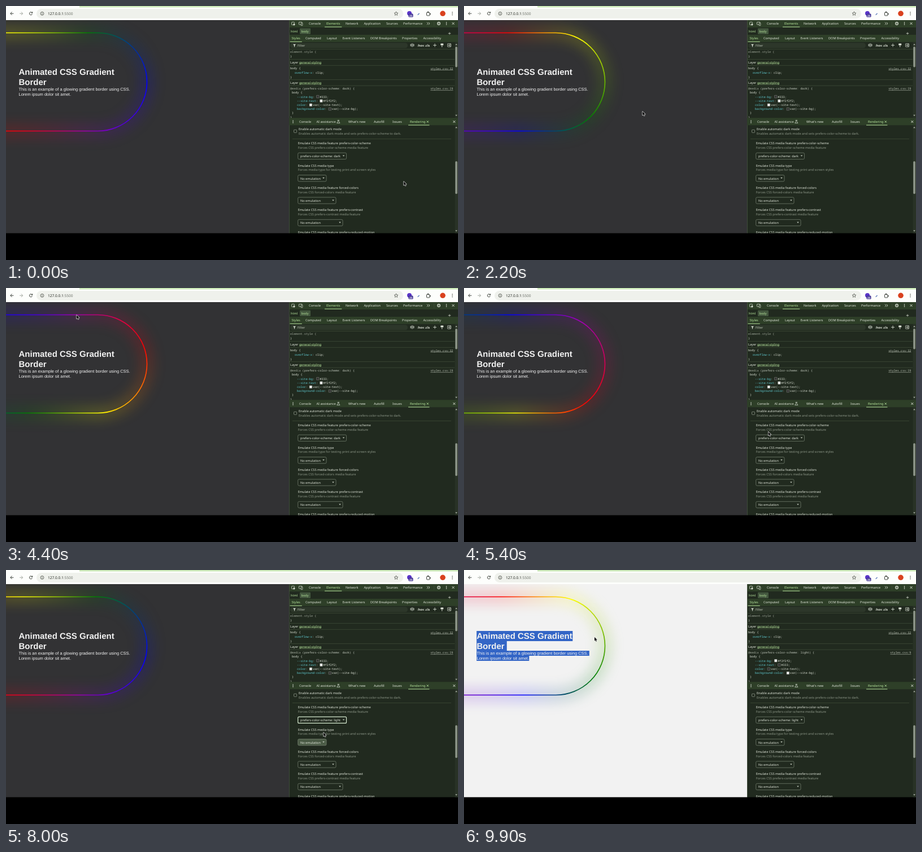
Write an HTML page with a canvas that moves like this. It is 800 by 450 pixels and loops after 10 s.

```html
<!DOCTYPE html>
<html lang="en">
<head>
<meta charset="utf-8">
<title>Animated CSS gradient border</title>
<style>
  html, body { margin: 0; width: 100%; height: 100%; overflow: hidden; background: #000; }
  canvas { display: block; width: 800px; height: 450px; }
</style>
</head>
<body>
<canvas id="stage" width="800" height="450"></canvas>
<script>
const ctx = document.getElementById('stage').getContext('2d');
const LOOP = 10000, STEP = 100;
const UI = '5.62px "Noto Sans", sans-serif';
const MONO = '5.156px "Noto Sans Mono", monospace';
const HEAD = 'bold 15px "Liberation Sans", Arial, sans-serif';
const BODY = '7.5px "Liberation Sans", Arial, sans-serif';
const PANEL = '#212a1f', BAR = '#2e3f28', RULE = '#46543f';
const INK = '#dfe5d9', DIM = '#8d9788', ACCENT = '#b5e29b', CYAN = '#62cfd6';

// time, x, y of the pointer tip
const PATH = [
  [0, 704, 311], [600, 704, 311], [1100, 514, 262], [2200, 316, 187], [3300, 214, 112],
  [4400, 125, 48], [4700, 150, 70], [5500, 556, 263], [6400, 579, 265], [6700, 576, 268],
  [7300, 562, 288], [8100, 562, 288], [9100, 247, 153], [9300, 116, 157],
  [9600, 24, 113], [9900, 231, 119], [10000, 231, 119]
];
const LIGHT_AT = 8100, FOCUS = [6400, 9300], MENU = [6500, 7800];

const between = (t, [a, b]) => t >= a && t < b;

function pointer(t) {
  const i = Math.max(1, PATH.findIndex(k => k[0] >= t));
  const [t0, x0, y0] = PATH[i - 1], [t1, x1, y1] = PATH[i];
  const u = (t - t0) / (t1 - t0), e = u * u * (3 - 2 * u);
  return { x: x0 + (x1 - x0) * e, y: y0 + (y1 - y0) * e };
}

function rect(x, y, w, h, color) {
  ctx.fillStyle = color;
  ctx.fillRect(x, y, w, h);
}

function round(x, y, w, h, r, fill, stroke, lw = 0.8) {
  ctx.beginPath();
  ctx.roundRect(x, y, w, h, r);
  if (fill) { ctx.fillStyle = fill; ctx.fill(); }
  if (stroke) { ctx.strokeStyle = stroke; ctx.lineWidth = lw; ctx.stroke(); }
}

function disc(x, y, r, color) {
  ctx.beginPath();
  ctx.arc(x, y, r, 0, 7);
  ctx.fillStyle = color;
  ctx.fill();
}

function ring(x, y, r, color, lw = 0.9, a = 0, b = Math.PI * 2) {
  ctx.beginPath();
  ctx.arc(x, y, r, a, b);
  ctx.strokeStyle = color;
  ctx.lineWidth = lw;
  ctx.stroke();
}

function line(color, lw, ...p) {
  ctx.beginPath();
  for (let i = 0; i < p.length; i += 2) ctx.lineTo(p[i], p[i + 1]);
  ctx.strokeStyle = color;
  ctx.lineWidth = lw;
  ctx.stroke();
}

function poly(color, ...p) {
  ctx.beginPath();
  for (let i = 0; i < p.length; i += 2) ctx.lineTo(p[i], p[i + 1]);
  ctx.closePath();
  ctx.fillStyle = color;
  ctx.fill();
}

function text(s, x, y, color = INK, font = UI, underline = false) {
  ctx.font = font;
  ctx.fillStyle = color;
  ctx.fillText(s, x, y);
  const w = ctx.measureText(s).width;
  if (underline) rect(x, y + 0.8, w, 0.5, color);
  return x + w;
}

const cross = (x, y, r, c) => { line(c, 0.9, x - r, y - r, x + r, y + r); line(c, 0.9, x - r, y + r, x + r, y - r); };
const dots = (x, y, gap, c) => { for (const d of [-gap, 0, gap]) disc(x, y + d, 0.75, c); };
const caret = (x, y, c, s = 1) => poly(c, x - 1.8, y - s, x + 1.8, y - s, x, y + s);

function browserBar() {
  rect(0, 0, 800, 25, '#fdfefc');
  rect(130, 0, 670, 2.5, '#cbe9b8');
  round(54, 5, 649, 17, 8.5, '#eff1ec');
  const ink = '#3f443c';
  line(ink, 1, 10.5, 10.5, 7.8, 13.3, 10.5, 16.1);
  line(ink, 1, 8, 13.3, 13.4, 13.3);
  line('#a3a8a0', 1, 27, 10.5, 29.7, 13.3, 27, 16.1);
  line('#a3a8a0', 1, 24.2, 13.3, 29.5, 13.3);
  ring(44, 13.3, 2.6, ink, 1, 0.3, 5.5);
  poly(ink, 47.2, 9.8, 47.2, 12.8, 44.2, 12.8);
  ring(64, 13.4, 2.9, ink, 0.8);
  line(ink, 0.8, 64, 13, 64, 15.1);
  rect(63.6, 11.6, 0.8, 0.8, ink);
  const font = '6.56px "Noto Sans", sans-serif';
  text(':5500', text('127.0.0.1', 74, 16, '#22261f', font), 16, '#6c7169', font);

  ctx.beginPath();
  for (let i = 0; i < 10; i++) {
    const a = -Math.PI / 2 + i * Math.PI / 5, r = i % 2 ? 1.6 : 3.6;
    ctx.lineTo(690.5 + r * Math.cos(a), 13.5 + r * Math.sin(a));
  }
  ctx.closePath();
  ctx.strokeStyle = ink;
  ctx.lineWidth = 0.7;
  ctx.stroke();

  disc(714, 13, 4, '#5a35c8');
  round(712.5, 13.4, 8, 6.4, 1.5, '#3d2f91');
  text('25', 713.7, 18.6, '#fff', 'bold 4.8px "Noto Sans", sans-serif');
  line('#4e6fb5', 1.2, 728.7, 15.8, 731.5, 13);
  round(744.5, 11.5, 5.5, 5.5, 0.6, null, ink, 1);
  disc(747, 10.7, 1.1, ink);
  disc(750.7, 14.2, 1.1, ink);
  disc(773, 13.3, 4.8, '#d9411e');
  dots(790, 13.3, 2.4, ink);
}

function pill() {
  ctx.beginPath();
  ctx.moveTo(-60, 47.5);
  ctx.lineTo(162.5, 47.5);
  ctx.arc(162.5, 134.5, 87, -Math.PI / 2, Math.PI / 2);
  ctx.lineTo(-60, 221.5);
}

function page(t, light) {
  ctx.save();
  ctx.beginPath();
  ctx.rect(0, 25, 501, 377.5);
  ctx.clip();
  rect(0, 25, 501, 378, light ? '#f2f2f2' : '#323234');

  // hue ring turns clockwise, 46 degrees a second
  const hue = ctx.createConicGradient((145 + 0.046 * t) * Math.PI / 180, 115, 134.5);
  ['#f00', '#ff0', '#008000', '#00f', '#a000b0', '#f00'].forEach((c, i) => hue.addColorStop(i / 5, c));
  ctx.strokeStyle = hue;
  ctx.filter = 'blur(12px)';
  ctx.globalAlpha = 0.26;
  ctx.lineWidth = 16;
  pill();
  ctx.stroke();
  ctx.filter = 'none';
  ctx.globalAlpha = 1;
  ctx.lineWidth = 1.7;
  pill();
  ctx.stroke();

  // the drag runs backwards from the end of the paragraph
  const rows = [
    ['Animated CSS Gradient', 122.3, HEAD, 108, 18, 170],
    ['Border', 139.8, HEAD, 126, 17, 53.5],
    ['This is an example of a glowing gradient border using CSS.', 150.2, BODY, 143, 9, 199.5],
    ['Lorem ipsum dolor sit amet.', 158.8, BODY, 152, 9, 93]
  ];
  rows.forEach(([s, y, font, top, h, w], i) => {
    const chosen = t >= 9400 && i >= 3 - (t - 9400) / 75;
    if (chosen) rect(22.3, top, w, h, '#3365c6');
    text(s, 22.5, y, chosen || !light ? '#f2f2f2' : '#2e2e2e', font);
  });
  ctx.restore();
}

function tabs(y, list, active) {
  for (const [s, x] of list) {
    const on = s === active;
    const end = text(s, x, y, on ? ACCENT : INK);
    if (on) rect(x - 3, y + 3.4, end - x + (s === 'Rendering' ? 10 : 6), 1, ACCENT);
  }
}

function scrollbar(top, bottom, y, h) {
  rect(794.5, top, 5.5, bottom - top, '#293226');
  round(795.2, y, 3.6, h, 1.8, '#8e968a');
  caret(797, top + 4, '#a9b1a4', -1.2);
  caret(797, bottom - 4, '#a9b1a4', 1.2);
}

function prop(name, value, y, swatch) {
  let x = text(name, 515, y, CYAN, MONO);
  x = text(':', x, y, INK, MONO);
  round(x + 3.6, y - 4.2, 4.6, 4.6, 0.3, swatch, '#8b9286', 0.5);
  text(value + ';', x + 9.4, y, INK, MONO);
}

function layer(y) {
  rect(501, y - 7.6, 293, 0.6, RULE);
  text('general-styling', text('Layer ', 503, y), y, ACCENT, UI, true);
  rect(501, y + 3.2, 293, 0.6, RULE);
}

function fileLink(s, y) {
  text(s, 791.5 - s.length * 3.094, y, '#c3cabd', MONO, true);
}

function inspector(light) {
  rect(501, 25, 299, 377.5, PANEL);
  rect(501, 25, 299, 13, BAR);
  rect(501, 51, 299, 12.8, BAR);
  rect(501, 25, 0.8, 377.5, RULE);

  round(505.5, 28.5, 5, 5, 0.8, null, INK, 0.7);
  poly(INK, 508, 31, 512, 32.6, 509.7, 35);
  round(518.5, 28.5, 5.5, 4.5, 0.5, null, INK, 0.7);
  round(522.3, 30, 2.6, 4.6, 0.5, BAR, INK, 0.7);
  tabs(33.2, [['Console', 536], ['Elements', 567], ['Network', 601], ['Application', 633.5],
    ['Sources', 673], ['Performance', 703]], 'Elements');
  for (const x of [745, 747.8]) line(INK, 0.8, x, 28.8, x + 2.2, 31, x, 33.2);
  rect(757.5, 27.5, 0.6, 7.5, RULE);
  ring(766, 31, 2.4, INK, 1.1);
  disc(766, 31, 0.8, INK);
  dots(779.5, 31, 2.1, INK);
  cross(791.5, 31, 2, INK);

  round(520, 39.5, 19, 10.5, 1, '#43573e');
  text('html', 504, 46.6, ACCENT);
  text('body', 522.5, 46.6, ACCENT);
  line(INK, 0.7, 785, 46.5, 785, 50.7);
  line(INK, 0.7, 782.7, 48.6, 787.3, 48.6);

  tabs(59.4, [['Styles', 505.5], ['Computed', 530], ['Layout', 568], ['Event Listeners', 595.5],
    ['DOM Breakpoints', 645], ['Properties', 701], ['Accessibility', 738.5]], 'Styles');

  round(503, 65.2, 208, 9.4, 4.7, '#2d372a');
  poly(INK, 508, 67.7, 513, 67.7, 511, 70, 511, 72.5, 510, 72.5, 510, 70);
  text('Filter', 516, 71.7, '#b9c1b3');
  for (const d of [0, 1.9]) line(INK, 0.7, 715.5, 68.4 + d, 719, 66.6 + d, 722.5, 68.4 + d, 719, 70.2 + d, 715.5, 68.4 + d);
  text(':hov', 728, 71.6, INK, 'bold ' + UI);
  text('.cls', 741, 71.6, INK, 'bold ' + UI);
  line(INK, 0.8, 756, 69.5, 762, 69.5);
  line(INK, 0.8, 759, 66.5, 759, 72.5);
  round(769.2, 66.6, 5, 3, 0.4, INK);
  line(INK, 0.9, 771.7, 69.5, 771.7, 73);
  round(781.5, 66.7, 6, 5.6, 0.5, null, INK, 0.7);
  line(INK, 0.7, 786, 66.7, 786, 72.3);
  poly(INK, 782.6, 69.5, 784.8, 67.9, 784.8, 71.1);
  rect(501, 76, 299, 0.6, RULE);

  ctx.save();
  ctx.beginPath();
  ctx.rect(501, 76, 293, 122.5);
  ctx.clip();
  text('element.style {', 503, 83, '#a2aa9d', MONO);
  text('}', 503, 91, INK, MONO);
  layer(101.7);
  text('body {', 503, 112, INK, MONO);
  fileLink('styles.css:32', 112.6);
  text(': clip;', text('overflow-x', 511, 120, CYAN, MONO), 120, INK, MONO);
  text('}', 503, 127.6, INK, MONO);
  layer(137.6);
  const bg = light ? '#f2f2f2' : '#333', fg = light ? '#333' : '#f2f2f2';
  const x = text('@media ', 503, 148, '#a2aa9d', MONO);
  text(`(prefers-color-scheme: ${light ? 'light' : 'dark'}) {`, x, 148, '#c9d0c4', MONO);
  fileLink(light ? 'styles.css:9' : 'styles.css:19', 148.4);
  text('body {', 506, 155, INK, MONO);
  prop('--site-bg', bg, 162.5, bg);
  prop('--site-text', fg, 170, fg);
  prop('color', 'var(--site-text)', 177.2, fg);
  prop('background-color', 'var(--site-bg)', 184.4, bg);
  text('}', 506, 191.2, INK, MONO);
  text('}', 503, 199.4, INK, MONO);
  ctx.restore();
  scrollbar(64, 198, 72, 36.5);
}

function select(x2, y, label, hover, focus) {
  round(516.7, y, x2 - 516.7, 11.3, 2, hover ? '#4b5b46' : PANEL, focus ? '#d6ead0' : '#7b8776', focus ? 1.2 : 0.7);
  text(label, 521, y + 8, INK);
  caret(x2 - 5, y + 5.4, '#c3cabd', 1.1);
}

function drawer(t, mouse) {
  rect(501, 198.3, 299, 12.9, BAR);
  dots(508, 205, 2.1, INK);
  tabs(207.1, [['Console', 519], ['AI assistance', 549.5], ["What's new", 606], ['Autofill', 651],
    ['Issues', 684], ['Rendering', 715]], 'Rendering');
  line(INK, 0.7, 587.5, 202.5, 587.5, 204.6, 585.7, 207.4, 590.9, 207.4, 589.1, 204.6, 589.1, 202.5);
  line(INK, 0.7, 586.7, 202.4, 589.9, 202.4);
  cross(746.3, 205, 1.6, ACCENT);
  cross(793.3, 205, 2, INK);

  ctx.save();
  ctx.beginPath();
  ctx.rect(501, 211, 299, 191.5);
  ctx.clip();
  round(509.5, 219.3, 5, 5, 0.8, null, '#98a192', 0.7);
  text('Enable automatic dark mode', 518, 220.4);
  text('Enables automatic dark mode and sets prefers-color-scheme to dark.', 518, 228.2, DIM);
  rect(507, 235.2, 281, 0.6, RULE);

  const isLight = t >= MENU[1], feature = 'Emulate CSS media feature ';
  const groups = [
    [feature + 'prefers-color-scheme', 'Forces CSS prefers-color-scheme media feature', 602.5],
    ['Emulate CSS media type', 'Forces media type for testing print and screen styles', 567],
    [feature + 'forced-colors', 'Forces CSS forced-colors media feature', 584],
    [feature + 'prefers-contrast', 'Forces CSS prefers-contrast media feature', 596],
    [feature + 'prefers-reduced-motion', '', 600]
  ];
  groups.forEach(([title, note, x2], i) => {
    const y = 245.2 + i * 39.4;
    text(title, 516.7, y);
    text(note, 516.7, y + 7.7, DIM);
    const label = i ? 'No emulation' : 'prefers-color-scheme: ' + (isLight ? 'light' : 'dark');
    const over = mouse.x > 517 && mouse.x < x2 && Math.abs(mouse.y - y - 20.5) < 5.7;
    const lit = over || (i === 1 && between(t, [MENU[1], 8200]));
    select(x2, y + 14.9, label, lit, !i && between(t, FOCUS));
  });

  if (between(t, MENU)) {
    round(516.7, 272.5, 86, 38.5, 1.5, '#384335', '#6d7868', 0.6);
    const hot = mouse.y > 283.5 ? 1 : mouse.y > 273 ? 0 : 2;
    ['No emulation', 'prefers-color-scheme: light', 'prefers-color-scheme: dark'].forEach((s, i) => {
      const y = 273.5 + i * 12;
      if (i === hot) rect(517.2, y, 85, 12, '#5b6e55');
      text(s, 521, y + 8.2);
    });
  }
  ctx.restore();
  scrollbar(211, 402.5, 275, 58);
}

function arrow({ x, y }) {
  ctx.save();
  ctx.translate(x, y);
  ctx.beginPath();
  [[0, 0], [0, 6.6], [1.6, 5.2], [2.7, 7.7], [3.8, 7.2], [2.7, 4.8], [4.8, 4.7]].forEach(p => ctx.lineTo(...p));
  ctx.closePath();
  ctx.lineJoin = 'round';
  ctx.lineWidth = 1.2;
  ctx.strokeStyle = '#e8e8e8';
  ctx.stroke();
  ctx.fillStyle = '#0c0c0c';
  ctx.fill();
  ctx.restore();
}

function draw(t) {
  const light = t >= LIGHT_AT, mouse = pointer(t);
  rect(0, 0, 800, 450, '#000');
  page(t, light);
  browserBar();
  inspector(light);
  drawer(t, mouse);
  arrow(mouse);
}

const start = performance.now();
let last = -1;
function tick() {
  const t = Math.floor(((performance.now() - start) % LOOP) / STEP) * STEP;
  if (t !== last) draw(last = t);
  requestAnimationFrame(tick);
}
ctx.textRendering = 'geometricPrecision';
tick();
</script>
</body>
</html>
```
